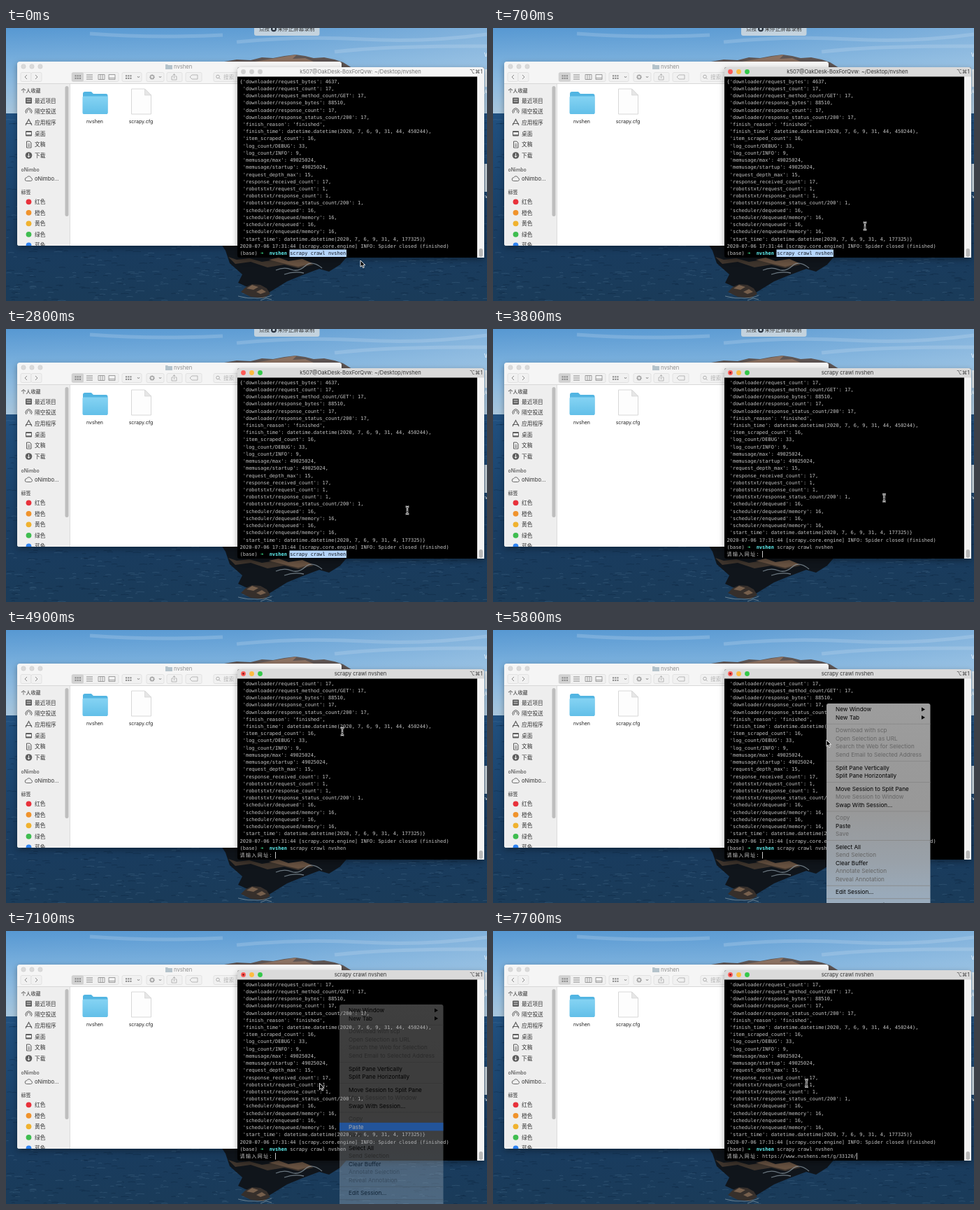
An HTML page for the animation above (8 s loop, 688x390 px).

```html
<!DOCTYPE html>
<html lang="zh">
<head>
<meta charset="utf-8">
<style>
html, body { margin: 0; width: 100%; height: 100%; overflow: hidden; background: #183a58; }
svg { display: block; width: 688px; height: 390px; }
text { font-family: Inter, "Noto Sans CJK SC", "Noto Sans CJK", sans-serif; white-space: pre; }
.mono, .mono text { font-family: "DejaVu Sans Mono", "Noto Sans CJK SC", "Noto Sans CJK", monospace; }
.window { filter: drop-shadow(0 3px 4px rgba(0, 0, 0, .35)); }
</style>
</head>
<body>
<svg id="stage" viewBox="0 0 688 390"></svg>
<script>
const LOOP = 8000, STEP = 100, ROW = 10.22, CELL = 4.214, LEFT = 334.5;
const $ = id => document.getElementById(id);

const text = (x, y, s, size = 7.65, fill = '#222', more = '') =>
  `<text x="${x}" y="${y}" font-size="${size}" fill="${fill}" ${more}>${s}</text>`;
const rect = (x, y, w, h, fill, more = '') =>
  `<rect x="${x}" y="${y}" width="${w}" height="${h}" fill="${fill}" ${more}/>`;
const dot = (x, y, r, fill, more = '') =>
  `<circle cx="${x}" cy="${y}" r="${r}" fill="${fill}" ${more}/>`;
const path = (d, fill = 'none', stroke = 'none', width = 1, more = '') =>
  `<path d="${d}" fill="${fill}" stroke="${stroke}" stroke-width="${width}" ${more}/>`;
const gradient = (id, colors, dir = 'x2="0" y2="1"') =>
  `<linearGradient id="${id}" ${dir}>${colors.map((c, i) =>
    `<stop offset="${i / (colors.length - 1)}" stop-color="${c}"/>`).join('')}</linearGradient>`;
const group = (id, body, more = '') => `<g id="${id}" ${more}>${body}</g>`;
const MIDDLE = 'text-anchor="middle"';

let seed = 7;
const random = () => (seed = seed * 16807 % 2147483647) / 2147483647;

function waves(count, color, opacity) {
  let d = '';
  for (let i = 0; i < count; i++) {
    const x = random() * 688, y = 126 + random() * 264, w = 3 + random() * 9;
    d += `M${x.toFixed(1)} ${y.toFixed(1)}q${(w / 2).toFixed(1)} -1 ${w.toFixed(1)} 0`;
  }
  return path(d, 'none', color, .9, `opacity="${opacity}"`);
}

function wallpaper() {
  return rect(0, 0, 688, 124, 'url(#sky)') +
    rect(0, 0, 688, 124, 'url(#haze)') +
    path('M330 20q90-9 180-4t178-7M470 34q80-9 218-8M120 8q90 7 190 2', 'none', '#d6e5f2', 5, 'opacity=".22"') +
    rect(0, 122, 688, 268, 'url(#sea)') +
    waves(900, '#07192c', .3) + waves(700, '#6f97b8', .22) +
    path('M312 48L330 45 350 46 366 42 382 43 398 40 414 38 428 40 440 43 455 42 470 45 482 49 500 60 H312Z', '#5f5654') +
    path('M356 48L380 44 398 41 416 38 410 44 428 43 440 48Z', '#8d7363') +
    path('M306 306L314 318 320 336 338 352 332 364 350 372 376 378 402 362 424 353 448 344 462 348 478 338 490 324 V306Z', '#10151b') +
    path('M318 327L330 331 348 329 366 334 386 331 404 336 428 332 440 338 418 343 398 338 374 342 350 334 328 337Z', '#3f352d') +
    path('M376 331l14-3 14 5 20-3 14 6-20 5-22-5z', '#695342') +
    path('M386 346q12-5 22-1t20-5 24 3M398 352q14-5 28-2', 'none', '#a9bac4', 1.3, 'opacity=".6"') +
    path('M336 377L343 370 352 366 364 367 373 372 378 380 368 386 350 384Z', '#362f2b') +
    path('M344 372L352 367 361 370 354 374ZM358 377l8-4 6 4-8 3z', '#765f4c') +
    path('M332 383q14 4 28 3t20-4M364 389l8-3 8 2', 'none', '#a5b4bb', 1, 'opacity=".55"') +
    text(684, 41, 'V', 7, '#fff') + rect(685, 59, 3, 25, '#dfe6ea') +
    text(684, 94, 'A', 7, '#fff') + rect(684.5, 194, 4, 40, '#c9d4dc') +
    text(685, 243, 'v', 7, '#fff');
}

const button = (x, w) => rect(x, 63.5, w, 13, '#f1f1f1', 'rx="2" stroke="#dcdcdc" stroke-width=".7"');

function toolbar() {
  const gray = '#a8a8a8', icon = '#8a8a8a';
  let out = rect(16, 48, 464, 32, '#f5f5f5', 'rx="3"') + rect(16, 79, 464, 1, '#d8d8d8');
  for (const x of [25, 37, 49]) out += dot(x, 55, 3.2, '#dadada', 'stroke="#c8c8c8" stroke-width=".5"');
  out += path('M228 52h3l1 1h6v6h-10z', '#b5c3cb') + text(240, 57.7, 'nvshen', 7.65, '#8f8f8f');
  for (const [x, w] of [[21, 15], [36, 15], [94, 67], [166, 28], [201, 25], [230, 22], [257, 23], [297, 178]])
    out += button(x, w);
  out += rect(94, 63.5, 17, 13, '#d2d2d2', 'rx="2"') +
    path('M30 67l-3 3 3 3M42 67l3 3-3 3M188 69l1.5 2 1.5-2M219 69l1.5 2 1.5-2', 'none', icon, 1) +
    path('M115 67h9M115 70h9M115 73h9', 'none', icon, 1) +
    path('M132 66.5h9v7h-9zM135 66.5v7M138 66.5v7M147 66.5h9v7h-9zM147 71.5h9', 'none', icon, .8);
  for (const x of [98.5, 101.7, 104.9, 171, 174.2, 177.4])
    out += rect(x, 67.3, 2.1, 2.1, icon) + rect(x, 70.8, 2.1, 2.1, icon);
  return out + dot(209, 70, 2.6, 'none', `stroke="${icon}" stroke-width="2" stroke-dasharray="1.2 .5"`) +
    path('M239 69h-2v5h7v-5h-2M240.5 72v-6M238.5 67.5l2-2 2 2', 'none', gray, .8) +
    path('M263 70l3-3h8v6h-8z', 'none', gray, .8) +
    dot(303, 69.5, 2.3, 'none', `stroke="${gray}" stroke-width=".9"`) +
    path('M304.7 71.2l2 2', 'none', gray, .9) + text(311, 73, '搜索', 7.6, '#b5b5b5');
}

function sidebar() {
  const ink = '#5e5e5e', header = 'font-weight="600"';
  const places = ['最近项目', '隔空投送', '应用程序', '桌面', '文稿', '下载'];
  const tags = { 红色: '#e8323c', 橙色: '#f0932c', 黄色: '#f0b22f', 绿色: '#3fbd50', 蓝色: '#2e83f2' };
  let out = rect(16, 80, 75, 231, '#eeeeee') + rect(91, 80, .8, 231, '#d4d4d4') +
    rect(84.5, 83, 5, 186, '#bebebe', 'rx="2.5"') +
    text(21.5, 92, '个人收藏', 7, '#666', header);
  places.forEach((s, i) => out += text(41, 106.8 + 15.6 * i, s, 7.7, '#333'));
  out += rect(28, 99.5, 9, 8.5, ink, 'rx="1"') + path('M29.5 102h6M29.5 105h6', 'none', '#eee', .9) +
    path('M29 122a4.5 4.5 0 1 1 7 0M30.7 120.5a2.4 2.4 0 1 1 3.6 0', 'none', ink, 1) +
    path('M28 139l4.5-8.5 4.5 8.5M28 136.5h9', 'none', ink, 1.2) +
    rect(28, 147, 9, 7.5, ink, 'rx="1"') + rect(29, 149, 7, 3.3, '#eee') +
    path('M29.5 162h4.5l2 2v7h-6.5zM31 166h3.5M31 168.5h3.5', 'none', ink, 1) +
    dot(32.5, 182, 4.8, ink) + path('M32.5 179v5.5M30.5 182.6l2 2 2-2', 'none', '#eee', 1) +
    text(21.5, 204.5, 'oNimbo', 7, '#666', header) +
    path('M29.5 218.5h6a2.2 2.2 0 0 0 .4-4.3 3.3 3.3 0 0 0-6.2-.5 2.4 2.4 0 0 0-.2 4.8z', 'none', ink, .9) +
    text(41, 217.8, 'oNimbo…', 7.6, '#333') + text(21.5, 236.8, '标签', 7, '#666', header);
  Object.entries(tags).forEach(([s, c], i) =>
    out += dot(32.5, 248.3 + 15.5 * i, 3.9, c) + text(41, 251.2 + 15.5 * i, s, 7.7, '#333'));
  return out;
}

function finder() {
  const body = rect(16, 60, 464, 251, '#fff') + sidebar() + toolbar() +
    path('M110 94q0-3 3-3h9l3 3h18q2.5 0 2.5 3v24q0 2-2 2h-31.5q-2 0-2-2z', '#52b5e2') +
    path('M109.5 99q0-1.500 1.500-1.500h33q1.500 0 1.500 1.500v22q0 2-2 2h-32q-2 0-2-2z', 'url(#folder)') +
    path('M179.5 87h19l9 9v27h-28z', '#fdfdfd', '#cfcfcf', .8) +
    path('M198.5 87v9h9z', '#e6e6e6', '#cfcfcf', .6) +
    text(127, 135.8, 'nvshen', 7, '#222', MIDDLE) + text(193, 135.8, 'scrapy.cfg', 7, '#222', MIDDLE);
  return `<g class="window">${group('finder', body, 'clip-path="url(#finderBox)"')}</g>`;
}

const stats = `downloader/request_bytes': 4637
downloader/request_count': 17
downloader/request_method_count/GET': 17
downloader/response_bytes': 88510
downloader/response_count': 17
downloader/response_status_count/200': 17
finish_reason': 'finished'
finish_time': datetime.datetime(2020, 7, 6, 9, 31, 44, 450244)
item_scraped_count': 16
log_count/DEBUG': 33
log_count/INFO': 9
memusage/max': 49025024
memusage/startup': 49025024
request_depth_max': 15
response_received_count': 17
robotstxt/request_count': 1
robotstxt/response_count': 1
robotstxt/response_status_count/200': 1
scheduler/dequeued': 16
scheduler/dequeued/memory': 16
scheduler/enqueued': 16
scheduler/enqueued/memory': 16
start_time': datetime.datetime(2020, 7, 6, 9, 31, 4, 177325)`.split('\n');

const cell = (col, row, s, fill = '#c4c4c4', more = '') =>
  text(LEFT + CELL * col, 78.7 + ROW * row, s, 7, fill, more);

function terminal() {
  const last = stats.length - 1, bold = 'font-weight="bold"';
  let log = stats.map((s, i) =>
    cell(0, i, (i ? ' ' : '{') + "'" + s + (i < last ? ',' : '}'))).join('');
  log += cell(0, 23, '2020-07-06 17:31:44 [scrapy.core.engine] INFO: Spider closed (finished)') +
    cell(0, 24, '(base)') + cell(7, 24, '➜', '#3ee08c', bold) + cell(10, 24, 'nvshen', '#62f4f4', bold) +
    rect(405.5, 316.5, 81.5, 10.5, '#b5d5fb', 'id="mark"') +
    cell(17, 24, 'scrapy crawl nvshen', '#c4c4c4', 'id="command"') +
    group('ask', [...'请输入网址：'].map((c, i) => cell(2 * i, 25, c)).join('') +
      cell(12, 25, '', '#c4c4c4', 'id="url"') + rect(0, 327.2, .9, 9.5, '#ddd', 'id="caret"'));
  const lights = ['#fc5b57', '#fdbc40', '#34c84a'].map((c, i) =>
    dot(339.5 + 12 * i, 62.5, 3.4, c, 'class="light"')).join('');
  return `<g class="window">` + rect(331, 56, 353, 272, '#000', 'rx="3"') + '</g>' +
    rect(674, 69, 10, 259, '#f4f4f4') + rect(676.5, 315, 5.5, 12, '#b9b9b9', 'rx="2.7"') +
    `<g class="mono" clip-path="url(#screen)">${group('log', log)}</g>` +
    path('M331 69.5V59q0-3 3-3h347q3 0 3 3v10.5z', '#dcdcdc', 'none', 1, 'id="bar"') + lights +
    dot(339.5, 62.5, 1.3, '#7d1512', 'id="edited"') +
    text(507, 65.4, '', 7.65, '#333', MIDDLE + ' id="title"') +
    text(681.5, 65.4, '⌥⌘1', 7.6, '#444', 'text-anchor="end"');
}

// Each block is a menu section; a leading "-" means a disabled entry.
const sections = [
  ['New Window', 'New Tab'],
  ['-Download with scp', '-Open Selection as URL', '-Search the Web for Selection', '-Send Email to Selected Address'],
  ['Split Pane Vertically', 'Split Pane Horizontally'],
  ['Move Session to Split Pane', '-Move Session to Window', 'Swap With Session…'],
  ['-Copy', 'Paste', '-Save'],
  ['Select All', '-Send Selection', 'Clear Buffer', '-Annotate Selection', '-Reveal Annotation'],
  ['Edit Session…'],
  ['Toggle Broadcasting Input']
];

function menu() {
  let y = 113.4, out = rect(477, 105, 148.5, 300, 'url(#menuFill)', 'rx="3"');
  sections.forEach((items, n) => {
    if (n) {
      out += rect(477, y - 2.6, 148.5, .8, '#868686');
      y += 7.1;
    }
    for (const s of items) {
      const off = s[0] === '-';
      out += text(490, y + 2.9, off ? s.slice(1) : s, 8.2, off ? '#656565' : '#000');
      if (n === 0) out += path(`M613 ${y - 2.8}l5 2.8-5 2.8z`, '#000');
      y += 11.5;
    }
  });
  return group('menu', out) +
    group('paste', rect(477, 273.8, 148.5, 11.6, '#1760c8') + text(490, 282.6, 'Paste', 8.2, '#fff'));
}

const banner = group('banner', rect(355, -12, 93.5, 23, '#cbd7df', 'rx="3" opacity=".93"') +
  text(362, 4, '点按', 7.6, '#333') + dot(383, 1.3, 4, '#2b3440') + rect(381.5, -.2, 3, 3, '#cbd7df') +
  text(388.5, 4, '来停止屏幕录制', 7.6, '#333'));

const pointers =
  group('arrow', path('M0 0V9.2L2.2 7.2 3.7 10.6 5.3 9.9 3.8 6.7H6.7Z', '#000', '#fff', .9)) +
  group('beam', ['#fff', '#111'].map((c, i) =>
    path('M-2.3-5.2Q0-5.2 0-3.5 0-5.2 2.3-5.2M0-3.5V3.5M-2.3 5.2Q0 5.2 0 3.5 0 5.2 2.3 5.2M-1.3 1.5h2.6',
      'none', c, i ? .8 : 2.4)).join(''));

$('stage').innerHTML = '<defs>' +
  gradient('sky', ['#5798d2', '#74acdb', '#8fbbdf', '#a9c6dc']) +
  gradient('haze', ['#c6dbec00', '#c6dbec10', '#c6dbec60'], 'x2="1" y2="0"') +
  gradient('sea', ['#21507f', '#1c4670', '#193c60', '#1a3b59']) +
  gradient('folder', ['#85d3f3', '#62bfe8']) +
  gradient('menuFill', ['#9d9d9d', '#9a9a9a', '#989898', '#99a1a9', '#9aafc3']) +
  `<clipPath id="screen">${rect(331, 70, 343, 258, '#000')}</clipPath>` +
  `<clipPath id="finderBox">${rect(16, 48, 464, 263, '#000', 'rx="3"')}</clipPath></defs>` +
  wallpaper() + finder() + terminal() + banner + menu() + pointers;

// time, x, y
const route = [
  [0, 507, 332], [300, 507, 332], [1100, 557, 234], [1400, 557, 234], [2500, 574, 259],
  [3500, 574, 259], [4700, 481, 145], [5000, 481, 145], [5400, 477, 157], [6200, 477, 157],
  [6600, 497, 278], [6900, 497, 278], [7100, 448.5, 217.5], [LOOP, 448.5, 217.5]
];

function pointerAt(t) {
  const i = route.findIndex(p => p[0] > t);
  const [t0, x0, y0] = route[i - 1], [t1, x1, y1] = route[i];
  let k = (t - t0) / (t1 - t0);
  k = k * k * (3 - 2 * k);
  return [x0 + (x1 - x0) * k, y0 + (y1 - y0) * k];
}

const clamp = v => Math.max(0, Math.min(1, v));
const show = (id, on) => $(id).setAttribute('visibility', on ? 'visible' : 'hidden');
const lights = [...document.querySelectorAll('.light')];
const lightColors = lights.map(l => l.getAttribute('fill'));

function draw(now) {
  const t = Math.floor(now % LOOP / STEP) * STEP;
  const active = t >= 700, running = t >= 3700, pasted = t >= 7200;
  const menuOn = t >= 5500 && t < 7200;

  lights.forEach((l, i) => l.setAttribute('fill', active ? lightColors[i] : '#d0d0d0'));
  show('edited', running);
  $('bar').setAttribute('fill', active ? '#dadada' : '#f5f5f5');
  $('title').setAttribute('fill', active ? '#333' : '#777');
  $('title').textContent = running ? 'scrapy crawl nvshen' : 'k507@OakDesk-BoxForQvw: ~/Desktop/nvshen';

  $('log').setAttribute('transform', `translate(0 ${running ? -ROW : 0})`);
  show('mark', !running);
  $('command').setAttribute('fill', running ? '#c4c4c4' : '#10151c');
  show('ask', running);
  const url = pasted ? 'https://www.nvshens.net/g/33120/' : '';
  $('url').textContent = url;
  $('caret').setAttribute('x', LEFT + CELL * (12 + url.length));
  show('banner', t < 4000);

  show('menu', menuOn);
  show('paste', menuOn && t >= 6600);
  $('menu').setAttribute('opacity', clamp((7180 - t) / 200));
  $('paste').setAttribute('opacity', clamp((7300 - t) / 300));

  const [x, y] = pointerAt(t);
  const arrow = !active || menuOn;
  show('arrow', arrow);
  show('beam', !arrow);
  for (const id of ['arrow', 'beam']) $(id).setAttribute('transform', `translate(${x} ${y})`);
}

const start = performance.now();
function tick() {
  draw(performance.now() - start);
  requestAnimationFrame(tick);
}
tick();
</script>
</body>
</html>
```
